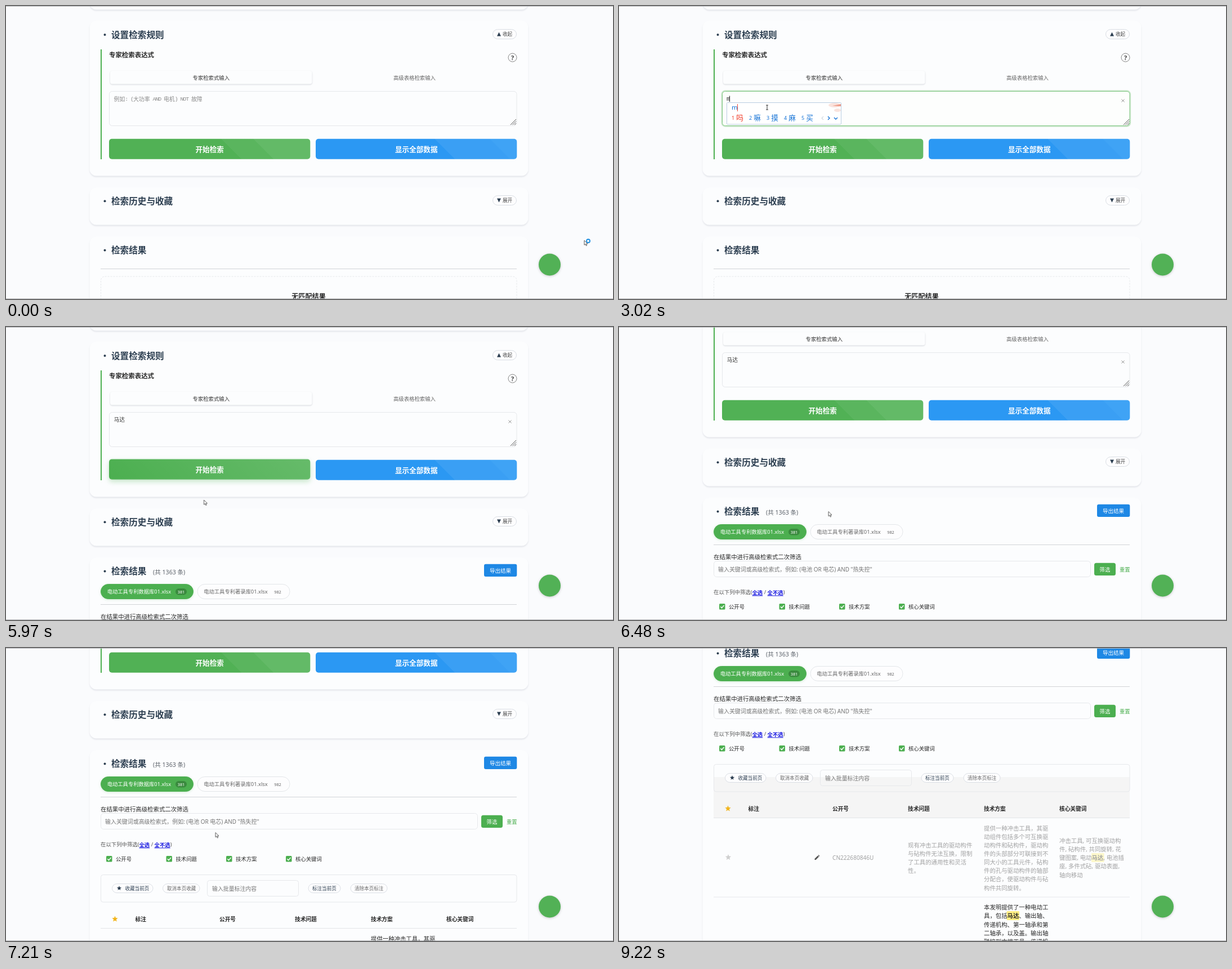
An HTML page for the animation above (9.6 s loop, 1078 px wide and 520 px high).

```html
<!DOCTYPE html>
<html lang="zh-CN">
<head>
<meta charset="utf-8">
<title>检索演示</title>
<style>
html, body { margin: 0; width: 100%; height: 100%; overflow: hidden; background: #fafbfd; }
svg { display: block; width: 1078px; height: 520px; }
text { font-family: "Noto Sans", "Noto Sans CJK SC", "Noto Sans CJK", sans-serif; dominant-baseline: central; white-space: pre; }
.b { font-weight: 700; }
.mid { text-anchor: middle; }
.mono { font-family: "Liberation Mono", "Noto Sans CJK SC", monospace; letter-spacing: -1.05px; }
.card { fill: #fcfdfe; filter: drop-shadow(0 2.8px 1.3px #e3e5ea); }
.tab { fill: #fcfdfe; filter: drop-shadow(0 1.4px 1px #d3d6db); }
.glow { filter: drop-shadow(0 1.5px 2px rgba(76,175,80,.25)); }
.fab { fill: #52b156; filter: drop-shadow(0 1.5px 2.2px rgba(0,0,0,.2)); }
.lift { filter: drop-shadow(0 4px 5px rgba(76,175,80,.3)); }
.box { fill: none; stroke: #e6e8eb; }
.pill { fill: #fdfdfe; stroke: #dadee4; }
.link { fill: #1515e0; font-weight: 700; text-decoration: underline; }
</style>
</head>
<body>
<svg id="stage" viewBox="0 0 1078 520"></svg>
<script>
const LOOP = 9600;
const GREEN = '#4caf50', NAVY = '#2c3e50', INK = '#262626', BLUE = '#1673d6';

// drawing helpers; y of a text is its middle
const text = (x, y, size, str, fill = INK, cls = '') =>
  `<text x="${x}" y="${y}" font-size="${size}" fill="${fill}" class="${cls}">${str}</text>`;
const rect = (x, y, w, h, r, attrs) =>
  `<rect x="${x}" y="${y}" width="${w}" height="${h}" rx="${r}" ${attrs}/>`;
const path = (d, attrs) => `<path d="${d}" ${attrs}/>`;
const group = (cls, ...parts) => `<g class="${cls}">${parts.join('')}</g>`;
const lines = (x, y, rows, fill) =>
  rows.map((row, i) => text(x, y + i * 15.15, 10.4, row, fill)).join('');
const rule = (y, color) => path(`M168 ${y}H907`, `stroke="${color}"`);
const card = (y, h) => rect(148.5, y, 779, h, 12, 'class="card"');
const pill = (x, y, w, h = 17) => rect(x + .5, y + .5, w - 1, h - 1, h / 2, 'class="pill"');
const cross = (x, y, r = 2.6) =>
  path(`M${x - r} ${y - r}l${2 * r} ${2 * r}m0 ${-2 * r}l${-2 * r} ${2 * r}`, 'stroke="#999" stroke-width="1"');
const caret = (x, cls) => path(`M${x + .5} 159.5V170`, `stroke="#222" class="${cls}"`);
const heading = (y, str) =>
  `<circle cx="175.5" cy="${y + .5}" r="2" fill="${NAVY}"/>` + text(187, y, 15.6, str, NAVY, 'b');
const fold = (y, up, str) =>
  pill(864, y - 9, 43, 18) +
  path(up ? `M872 ${y + 3.5}h7l-3.5 -7z` : `M872 ${y - 3.5}h7l-3.5 7z`, `fill="${NAVY}"`) +
  text(882, y, 8.6, str, '#444');
const star = (cx, cy, r, fill) => {
  const pts = Array.from({ length: 10 }, (_, i) => {
    const a = i * Math.PI / 5, q = i % 2 ? r * .45 : r;
    return (cx + q * Math.sin(a)).toFixed(1) + ',' + (cy - q * Math.cos(a)).toFixed(1);
  });
  return `<polygon points="${pts.join(' ')}" fill="${fill}"/>`;
};
// button sheen running from the bottom left to the top right
const sheen = (id, stops) =>
  `<linearGradient id="${id}" gradientUnits="userSpaceOnUse" x1="0" y1="36" x2="196.5" y2="-160.5">` +
  stops.map(([at, color]) => `<stop offset="${at}" stop-color="${color}"/>`).join('') + '</linearGradient>';
const bands = (id, stops) =>
  sheen(id, stops.flatMap(([from, to, color]) => [[from, color], [to, color]]));
const button = (x, fill, str) =>
  `<g transform="translate(${x} 236)">${rect(0, -.2, 357.3, 36, 5, `fill="url(#${fill})"`)}` +
  text(178.7, 18, 12.6, str, '#fff', 'b mid') + '</g>';

// input method panel with its inline text
function panel(cls, typed, words) {
  let x = 200, list = '';
  words.forEach((word, i) => {
    const color = i ? BLUE : '#f0321e';
    list += text(x, 198, 9, i + 1, color) + text(x + 8.3, 198, 12.6, word, color);
    x += 18.4 + 12.6 * word.length;
  });
  const end = 203.5 + 7 * typed.length;
  return group(cls,
    text(191, 165, 10, typed, '#333', 'mono'), caret(191 + 5 * typed.length, ''),
    rect(191.5, 171.5, x + 39 - 191, 38.5, 1, 'fill="#fff" stroke="#b9cde1"'),
    `<ellipse cx="${x + 28}" cy="176" rx="11" ry="4" fill="#f9dcd5" opacity=".8"/>`,
    `<ellipse cx="${x + 33}" cy="185" rx="6" ry="3" fill="#f8dcd4" opacity=".8"/>`,
    path(`M${x + 24} 177l15 -3v4z`, 'fill="#ee9a88"'),
    text(200, 179.5, 11.4, typed, BLUE),
    path(`M${end} 174V187`, 'stroke="#f0321e" stroke-width=".9"'),
    list,
    path(`M${x + 8} 196l-3 3 3 3`, 'stroke="#b8c4d0" fill="none"'),
    path(`M${x + 16} 196l3 3 -3 3`, `stroke="${BLUE}" stroke-width="1.4" fill="none"`),
    path(`M${x + 27} 198l3 3 3 -3`, `stroke="${BLUE}" stroke-width="1.4" fill="none"`));
}

const panels = [
  panel('ime1', 'm', ['吗', '嘛', '摸', '麻', '买']),
  panel('ime2', 'ma', ['吗', '嘛', '马', '妈', '麻']),
  panel('ime3', 'mad', ['马达', '买的', '卖掉', '买到', '卖的']),
  panel('ime4', 'mada', ['马达', '马大', '麻大', '妈大', '吗'])
];

const rules = [
  card(-80, 86.5), card(26, 275.5), card(322, 66.5), card(409, 800),
  heading(50.5, '设置检索规则'), fold(50, true, '收起'),
  rect(168, 77, 2, 195, 0, `fill="${GREEN}"`),
  text(183, 86, 11.45, '专家检索表达式', INK, 'b'),
  '<circle cx="899.5" cy="91.5" r="7.5" fill="none" stroke="#777" stroke-width=".9"/>',
  text(899.5, 91.7, 11, '?', '#444', 'b mid'),
  rect(185, 115, 358.5, 23.5, 4, 'class="tab"'),
  text(364.3, 127, 9.35, '专家检索式输入', '#333', 'mid'),
  text(725.5, 127, 9.4, '高级表格检索输入', '#666', 'mid'),
  rect(183.5, 151.5, 723.5, 61, 5, 'class="box"'),
  group('focus',
    rect(182.5, 150.5, 725.5, 63, 6, 'fill="none" stroke="#d0e9d1" stroke-width="2.4"'),
    rect(183.5, 151.5, 723.5, 61, 5, 'fill="#fdfefd" stroke="#7cc580"')),
  path('M896 211l10 -10M899.5 211l6.5 -6.5M903 211l3 -3', 'stroke="#555"'),
  group('hint', text(191.5, 164.5, 9.9,
    '例如<tspan class="mono">: (</tspan>大功率<tspan class="mono"> AND </tspan>电机<tspan class="mono">) NOT </tspan>故障', '#8a8a8a')),
  group('typed', text(191.5, 164.5, 9.8, '马达', '#333')),
  group('clear', cross(895, 168)),
  caret(191, 'caret1'), caret(211, 'caret2'),
  group('search', group('lift', button(183, 'smooth', '开始检索'))),
  group('rest', button(183, 'shine', '开始检索')),
  button(550, 'sky', '显示全部数据'),
  heading(345.8, '检索历史与收藏'), fold(345, false, '展开'),
  heading(433, '检索结果')
];

const empty = group('empty',
  rule(466.5, '#d2d4d7'),
  rect(168.5, 480, 738.5, 120, 7, 'class="box" stroke-dasharray="3 2"'),
  text(537.5, 515.8, 12.1, '无匹配结果', INK, 'b mid'));

const chip = (x, fill, stroke, color, name) =>
  rect(x + .5, 456.5, 164, 26, 13, `fill="${fill}" stroke="${stroke}"`) +
  text(x + 11.7, 469.5, 9.3, name, color);
const check = (x, str) =>
  rect(x, 597, 10.5, 10.5, 1.5, `fill="${GREEN}"`) +
  path(`M${x + 2.3} 602.3l2.2 2.3 4 -4.6`, 'stroke="#fff" stroke-width="1.4" fill="none"') +
  text(x + 17, 602, 9.35, str);
const tool = (x, w, tx, str, color) => pill(x, 646, w) + text(tx, 655, 8.55, str, color);
const head = (x, str) => text(x, 709, 9.7, str, INK, 'b');
const mark = (x, y) => rect(x, y - 8, 22.5, 16, 1, 'fill="#ffee84"');
const hit = '<tspan class="b">马达</tspan>';

const results = group('results',
  text(261, 434.5, 10.6, '(共 1363 条)', '#5a6068'),
  rect(849, 420.8, 58.3, 22.3, 3, 'fill="#1e88e5"'),
  text(878, 432, 9.5, '导出结果', '#fff', 'mid'),
  group('glow', chip(168, GREEN, GREEN, '#fff', '电动工具专利数据库01.xlsx')),
  rect(301, 464, 20, 11.5, 5.7, 'fill="#3a8a3e"'),
  text(311, 469.8, 7.4, '381', '#fff', 'mid'),
  chip(339.5, '#fdfdfe', '#e3e6e9', '#666', '电动工具专利著录库01.xlsx'),
  text(482.5, 469.8, 7.4, '982', '#666', 'mid'),
  rule(492.5, '#d2d4d7'),
  text(168, 514, 10.4, '在结果中进行高级检索式二次筛选'),
  rect(168.5, 521.5, 669, 28, 5, 'class="box"'),
  text(176, 536, 9.95, '输入关键词或高级检索式，例如: (电池 OR 电芯) AND "热失控"', '#757575'),
  rect(844, 524.8, 38, 22.2, 3.5, `fill="${GREEN}"`),
  text(863, 536, 9.4, '筛选', '#fff', 'mid'),
  text(889, 536, 9.3, '重置', GREEN),
  text(168, 576.5, 9.4,
    '在以下列中筛选(<tspan class="link">全选</tspan> / <tspan class="link">全不选</tspan>)', '#555'),
  check(178, '公开号'), check(284.5, '技术问题'), check(391, '技术方案'), check(497, '核心关键词'),
  rect(168, 653, 739, 72, 0, 'fill="#f5f5f5" class="shade"'),
  rect(168.5, 630.5, 738.5, 48.5, 4, 'class="box"'),
  tool(188, 73.5, 211.5, '收藏当前页', NAVY), star(201, 654.3, 4.3, NAVY),
  tool(278, 66.5, 286, '取消本页收藏', '#666'),
  rect(357.5, 640.5, 162, 28, 4, 'class="box"'),
  text(366, 655, 9.9, '输入批量标注内容', '#757575'),
  group('wipe', cross(507, 655)),
  tool(536.5, 58, 544, '标注当前页', NAVY),
  tool(611.5, 66, 619, '清除本页标注', '#666'),
  star(193.5, 709, 5.4, '#f2b51d'),
  head(229.5, '标注'), head(379, '公开号'), head(513, '技术问题'), head(648, '技术方案'), head(782, '核心关键词'),
  rule(725.5, '#e3e5e8'),
  star(194, 795.5, 5.4, '#cfcfcf'),
  path('M347.5 800v-2l5.5 -5.5 2 2 -5.5 5.5zM353.6 791.9l.8 -.8 2 2 -.8 .8z', 'fill="#555"'),
  group('row',
    text(379, 796, 10.1, 'CN222680846U'),
    lines(513, 773.5, ['现有冲击工具的驱动构件', '与砧构件无法互换，限制', '了工具的通用性和灵活', '性。']),
    lines(648, 743.5, ['提供一种冲击工具，其驱', '动组件包括多个可互换驱', '动构件和砧构件，驱动构',
      '件的头部部分可联接到不', '同大小的工具元件，砧构', '件的孔与驱动构件的轴部', '分配合，使驱动构件与砧', '构件共同旋转。']),
    mark(839, 796),
    lines(782, 766, ['冲击工具, 可互换驱动构', '件, 砧构件, 共同旋转, 花',
      `键图案, 电动${hit}, 电池插`, '座, 多件式砧, 驱动表面,', '轴向移动'])),
  rule(866, '#e6e8eb'),
  mark(688.5, 899),
  lines(648, 884.2, ['本发明提供了一种电动工', `具，包括${hit}、输出轴、`, '传递机构、第一轴承和第',
    '二轴承，以及盖。输出轴', '联接到末端工具，传递机']));

const pointer = group('pointer',
  group('arrow', path('M0 0V8.2L2 6.5 3.3 9.5 4.7 8.9 3.4 6H6Z', 'fill="#fff" stroke="#333" stroke-width=".8"')),
  group('busy', '<circle cx="7" cy="1" r="3" fill="none" stroke="#1e8fe0" stroke-width="1.8"/>'),
  group('beam', path('M-2 -4H2M0 -4V4M-2 4H2', 'stroke="#222" stroke-width=".9"')),
  group('hand', path('M-1.5 -4.5c0 -1.3 1.8 -1.3 1.8 0v3l3.3 .8v3.2L2.7 5.2H-1.5L-3.8 1.3c-.4 -1 .7 -1.4 1.3 -.7l1 1Z',
    'fill="#fff" stroke="#222" stroke-width=".8"')));

document.getElementById('stage').innerHTML =
  '<defs>' +
  bands('shine', [[0, .6, '#51b155'], [.6, .745, '#5ab55e'], [.745, 1, '#63ba67']]) +
  bands('sky', [[0, .63, '#2b98f3'], [.63, .88, '#3a9ff4'], [.88, 1, '#3fa3f5']]) +
  sheen('smooth', [[0, GREEN], [1, '#66bb6a']]) + '</defs>' +
  group('page', ...rules, empty, results, ...panels) +
  '<circle cx="965.5" cy="459" r="19.5" class="fab"/>' +
  path('M0 .5H1078M0 519.5H1078', 'stroke="#b4b6b9"') + pointer;

// timeline: hard steps at given milliseconds
let css = '', count = 0;
function track(cls, prop, stops, wrap = v => v) {
  const name = 'k' + count++;
  const keys = stops.map(([ms, v]) => `${Math.floor(ms / LOOP * 1e4) / 100}%{${prop}:${wrap(v)}}`);
  css += `@keyframes ${name}{${keys.join('')}}.${cls}{animation:${name} ${LOOP}ms step-end infinite}`;
}
// visibility that flips at each time
const flips = (cls, first, ...times) =>
  track(cls, 'opacity', [[0, first], ...times.map((ms, i) => [ms, (first + i + 1) % 2])]);

track('page', 'transform', [[0, 0], [6210, 45], [6330, 95], [6480, 106], [6600, 124], [6720, 169.5],
  [6840, 205], [6960, 212], [7210, 228], [7330, 275], [7480, 308], [7600, 317], [7720, 318],
  [8090, 345], [8210, 405], [8330, 424]], v => `translateY(${-v}px)`);
track('pointer', 'transform', [[0, [1027, 416]], [650, [1000, 405]], [770, [900, 370]], [890, [700, 305]],
  [1010, [480, 225]], [1130, [340, 198]], [1250, [280, 183]], [1370, [263, 180]],
  [4380, [270, 190]], [4500, [285, 215]], [4620, [296, 240]], [4740, [303, 252]], [4860, [305, 257]],
  [5850, [330, 285]], [5970, [351.5, 307]], [6090, [372, 327.5]],
  [8480, [400, 332]], [8600, [500, 352]], [8720, [650, 386]], [8840, [800, 426]], [8960, [940, 470]],
  [9080, [1050, 516.5]], [9220, [1100, 540]]], ([x, y]) => `translate(${x}px,${y}px)`);
flips('busy', 1, 1010);
flips('arrow', 1, 1130, 4500, 4620, 5850, 7480, 8210);
flips('beam', 0, 1130, 4500, 7480, 8210);
flips('hand', 0, 4620, 5850);

track('focus', 'opacity', [[0, 0], [1660, .5], [1780, 1], [5230, .6], [5360, .25], [5480, 0]]);
flips('clear', 0, 1250);
flips('hint', 1, 3020);
flips('caret1', 0, 1510, 2150, 2650, 3020);
flips('ime1', 0, 3020, 3140);
flips('ime2', 0, 3140, 3260);
flips('ime3', 0, 3260, 3380);
flips('ime4', 0, 3380, 3760);
flips('typed', 0, 3760);
flips('caret2', 0, 3760, 4380, 4860, 5230);

track('search', 'transform', [[0, 0], [4740, -.8], [4860, -1.6], [5970, -1.2], [6090, 0]], v => `translateY(${v}px)`);
flips('rest', 1, 4740, 6090);
flips('lift', 0, 4740, 6090);

flips('empty', 1, 5360);
flips('results', 0, 5360);
flips('wipe', 0, 7480, 8480);
flips('shade', 0, 8480);
track('row', 'opacity', [[0, 1], [8480, .85], [8600, .7], [8720, .55], [8840, .42]]);

document.head.appendChild(document.createElement('style')).textContent = css;
</script>
</body>
</html>
```
